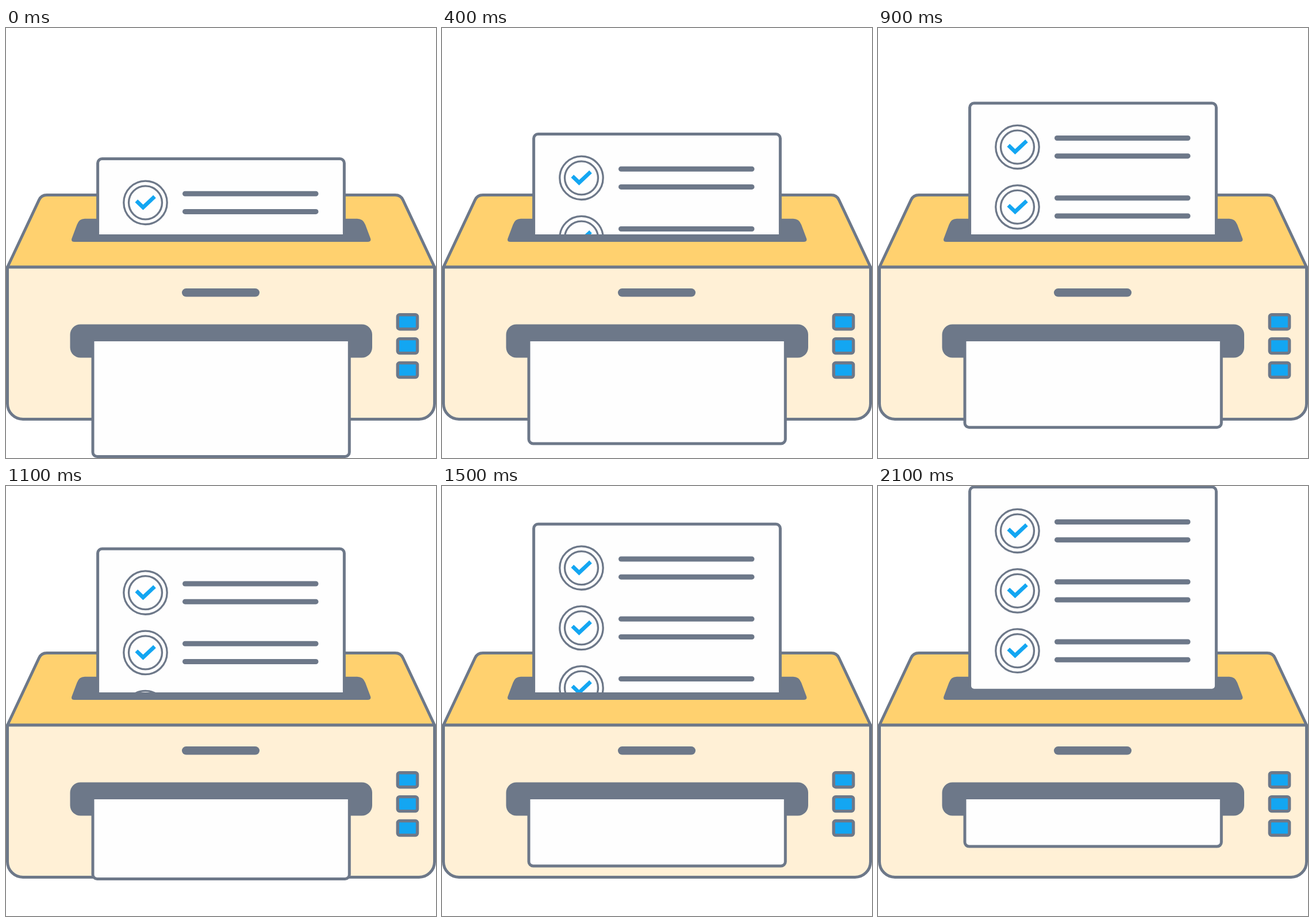
Animation of 748x748 px, one loop 3.1 s. Source, as an HTML page:

```html
<!DOCTYPE html>
<html lang="en">
<head>
<meta charset="utf-8">
<title>Printer</title>
<style>
  html, body { margin: 0; width: 100%; height: 100%; overflow: hidden; background: #fff; }
  svg { display: block; width: 100%; height: 100%; }
  .line { stroke: #6d7889; stroke-width: 5; stroke-linejoin: round; }
  .dark { fill: #6d7889; }
  .paper { fill: #fefefe; }
  .ring { fill: none; stroke: #6d7889; stroke-width: 3.3; }
  .check { fill: none; stroke: #13a6f2; stroke-width: 6.8; }
  .button { fill: #13a6f2; stroke-width: 5.4; }
</style>
</head>
<body>
<svg viewBox="0 0 748 748">
  <defs>
    <clipPath id="aboveSlot"><rect width="748" height="359"/></clipPath>
    <clipPath id="belowSlot"><rect y="545" width="748" height="203"/></clipPath>
    <g id="item">
      <circle class="ring" r="37.7"/>
      <circle class="ring" r="29"/>
      <path class="check" d="M-15.7-3 L-4 8.2 L16-10.6"/>
      <rect class="dark" x="64.5" y="-20.1" width="236.5" height="9" rx="4.5"/>
      <rect class="dark" x="64.5" y="11.1" width="236.5" height="9" rx="4.5"/>
    </g>
    <rect id="button" class="line button" x="681.3" y="498.7" width="34.3" height="25" rx="3.5"/>
  </defs>

  <path class="line" fill="#ffd16f" d="M2.5 416 L57.5 299 Q61.5 290.5 71 290.5 H677 Q686.5 290.5 690.5 299 L745.5 416 Z"/>
  <path class="line" fill="#fff0d6" d="M2.5 416 H745.5 V653.5 A27 27 0 0 1 718.5 680.5 H29.5 A27 27 0 0 1 2.5 653.5 Z"/>
  <path class="dark" d="M119 372 Q112.5 372 114.5 366 L123.5 342 Q127 331.8 137 331.8 H611 Q621 331.8 625 342 L634 366 Q636 372 629 372 Z"/>
  <rect class="dark" x="306" y="453" width="135" height="14.6" rx="7.3"/>
  <rect class="dark" x="111.5" y="515.5" width="525.5" height="58" rx="18"/>
  <use href="#button"/>
  <use href="#button" y="41.9"/>
  <use href="#button" y="83.8"/>

  <g clip-path="url(#aboveSlot)">
    <g id="feed">
      <rect class="line paper" x="159.6" y="2.5" width="428.8" height="353.5" rx="7.5"/>
      <use href="#item" x="242.5" y="78.8"/>
      <use href="#item" x="242.5" y="183.1"/>
      <use href="#item" x="242.5" y="287.4"/>
    </g>
  </g>
  <g clip-path="url(#belowSlot)">
    <rect id="output" class="line paper" x="151" y="445" width="446.3" height="300.5" rx="7.5"/>
  </g>
</svg>
<script>
  const LOOP = 3100, STEP = 100, LAST_STEP = 21;
  const feed = document.getElementById('feed');
  const output = document.getElementById('output');
  const shift = (node, y) => node.setAttribute('transform', `translate(0 ${y})`);

  function draw() {
    const time = performance.now() % LOOP;
    const step = Math.min(LAST_STEP, Math.floor(time / STEP));
    shift(feed, 225 - 10.75 * step);
    shift(output, -5.64 * step);
    requestAnimationFrame(draw);
  }
  draw();
</script>
</body>
</html>
```
